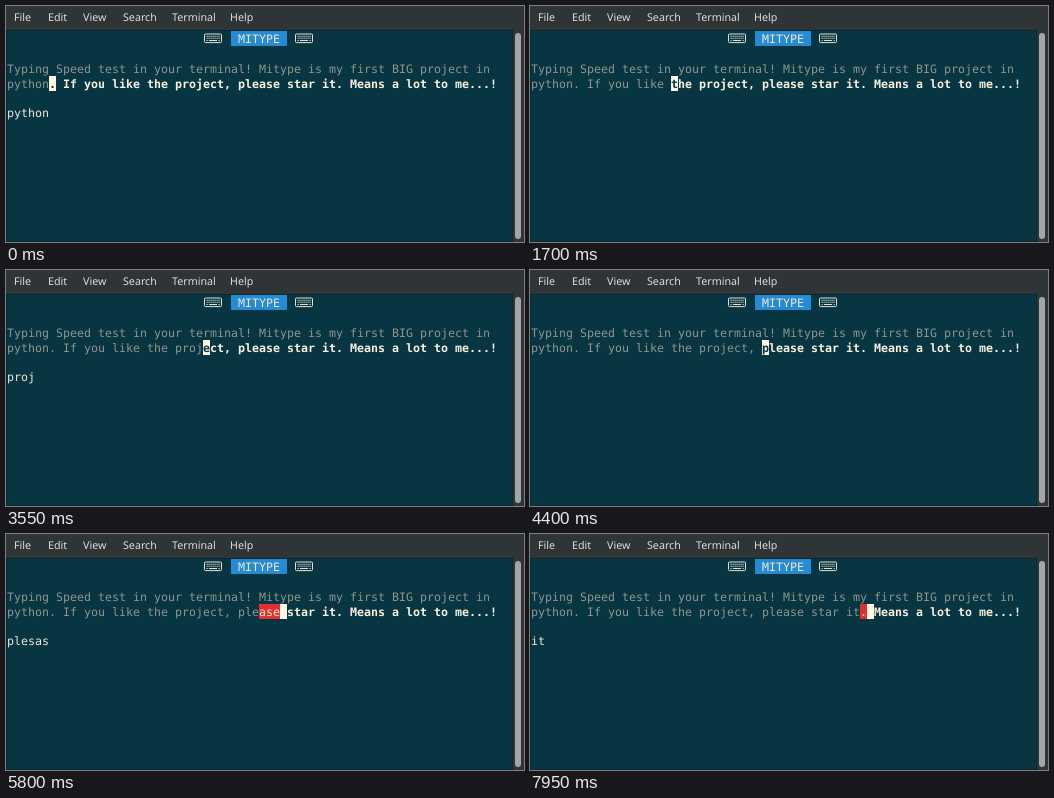
These frames come from a looping animation (518x236 px, 8 s). An HTML page:

```html
<!DOCTYPE html>
<html lang="en">
<head>
<meta charset="utf-8">
<title>Typing test</title>
<style>
  html, body { margin: 0; width: 100%; height: 100%; overflow: hidden; background: #2f3537; }
  svg { display: block; width: 518px; height: 236px; }
  text { white-space: pre; text-rendering: geometricPrecision; }
  .menu text { font: 10.7px "Noto Sans", sans-serif; fill: #dcdcdc; }
  .term text { font: 11.63px "DejaVu Sans Mono", monospace; fill: #eee8d5; }
  .term .dim { fill: #8f958d; }
  .term .bold { font-weight: bold; fill: #f8f2e0; }
  .term .dark { font-weight: bold; fill: #073642; }
</style>
</head>
<body>
<svg viewBox="0 0 518 236">
  <defs>
    <g id="keyboard" fill="none" stroke="#e4e0d0">
      <rect x=".5" y=".5" width="17" height="8.6" rx="1"/>
      <path d="M2.5 2.8H16M2.5 4.8H16" stroke-width="1.1" stroke-dasharray="1.2 .8"/>
      <path d="M2.5 7H3.7M5 7H13M14.5 7H15.7" stroke-width="1.1"/>
    </g>
  </defs>
  <rect width="518" height="236" fill="#2f3537"/>
  <g class="menu" id="menu"></g>
  <rect y="24" width="507" height="212" fill="#042a34"/>
  <rect x="1" y="25" width="505" height="210" fill="#073541"/>
  <rect x="509" y="27" width="6" height="206" rx="3" fill="#a3a6a6"/>
  <g class="term" id="term">
    <use href="#keyboard" x="198" y="27.5"/>
    <use href="#keyboard" x="289" y="27.5"/>
    <rect x="225" y="25" width="56" height="15" fill="#268bd2"/>
  </g>
</svg>
<script>
const NS = "http://www.w3.org/2000/svg";
const LOOP = 8000, CELL = 7;
const INTRO = "Typing Speed test in your terminal! Mitype is my first BIG project in";
const LINE = "python. If you like the project, please star it. Means a lot to me...!";

// Keys and the moment each is pressed; "<" is backspace.
const KEYS = ". If you like the project, plesas<<<ase star it ";
const TIMES = [
  80, 200, 320, 440, 560, 680, 790, 1000, 1120, 1240, 1360, 1470, 1570, 1670,
  1950, 2550, 2800, 2950, 3100, 3250, 3400, 3530, 3660, 3790, 3920, 4060, 4270,
  4800, 5100, 5220, 5350, 5480, 5610, 5950, 6030, 6110, 6250, 6360, 6600, 6800,
  6930, 7080, 7230, 7400, 7550, 7660, 7760, 7880
];

const term = document.getElementById("term");
const colX = col => 1 + col * CELL;
const rowY = row => 25 + row * 14.9;

function add(parent, tag, attrs, content = "") {
  const el = document.createElementNS(NS, tag);
  for (const key in attrs) el.setAttribute(key, attrs[key]);
  el.textContent = content;
  return parent.appendChild(el);
}

const addText = (row, style, col = 0, content = "") =>
  add(term, "text", { x: colX(col), y: rowY(row) + 11.8, class: style }, content);

const addBlock = (row, fill) =>
  add(term, "rect", { y: Math.round(rowY(row)), height: 15, width: 0, fill });

function place(el, col, content) {
  el.setAttribute("x", colX(col));
  el.textContent = content;
}

function cover(el, from, to) {
  el.setAttribute("x", colX(from));
  el.setAttribute("width", (to - from) * CELL);
}

const menu = document.getElementById("menu");
[["File", 8], ["Edit", 42], ["View", 77], ["Search", 117], ["Terminal", 166], ["Help", 224]]
  .forEach(([label, x]) => add(menu, "text", { x, y: 15.3 }, label));

addText(0, "", 33, "MITYPE");
addText(2, "dim", 0, INTRO);
const errorBlock = addBlock(3, "#dc322f");
const cursorBlock = addBlock(3, "#fdf6e3");
const done = addText(3, "dim");
const wrong = addText(3, "");
const current = addText(3, "dark");
const rest = addText(3, "bold");
const input = addText(5, "");

function typedAt(time) {
  let start = 0, word = "python";
  for (let i = 0; i < KEYS.length && TIMES[i] <= time; i++) {
    const key = KEYS[i];
    if (key === "<") {
      word = word.slice(0, -1);
    } else if (key === " " && LINE.startsWith(word + " ", start)) {
      start += word.length + 1;
      word = "";
    } else {
      word += key;
    }
  }
  return { start, word };
}

function draw(time) {
  const { start, word } = typedAt(time);
  const cursor = start + word.length;
  let good = start;
  while (good < cursor && word[good - start] === LINE[good]) good++;

  place(done, 0, LINE.slice(0, good));
  place(wrong, good, LINE.slice(good, cursor));
  place(current, cursor, LINE[cursor]);
  place(rest, cursor + 1, LINE.slice(cursor + 1));
  cover(errorBlock, good, cursor);
  cover(cursorBlock, cursor, cursor + 1);
  input.textContent = word;
}

const begin = performance.now();
function tick(now) {
  draw(Math.max(0, now - begin) % LOOP);
  requestAnimationFrame(tick);
}
draw(0);
requestAnimationFrame(tick);
</script>
</body>
</html>
```
